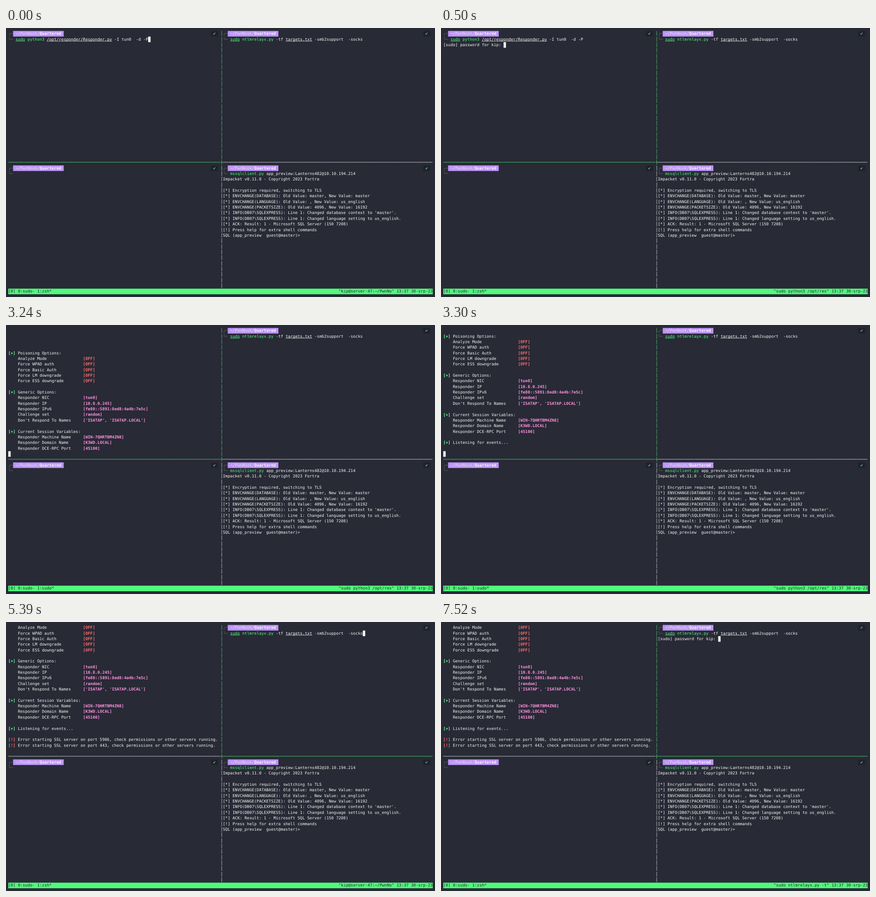
Recreate the animation shown at these times as an HTML page. Size 945 by 593 pixels, loop 8 s.

```html
<!DOCTYPE html>
<html lang="en">
<head>
<meta charset="utf-8">
<title>Terminal panes</title>
<style>
  html, body { margin: 0; width: 100%; height: 100%; overflow: hidden; background: #282a36; }
  svg { display: block; width: 945px; height: 593px; }
  text {
    font: 8.824px "DejaVu Sans Mono", monospace;
    text-rendering: geometricPrecision;
    white-space: pre;
    fill: #f8f8f2;
  }
  .bold { font-weight: bold; }
  .dir { fill: #e4e4e4; }
  .gray { fill: #6c6c6c; }
  .green { fill: #50fa7b; }
  .lime { fill: #69ff94; }
  .red { fill: #ff6e6e; }
  .pink { fill: #ff92df; }
  .dark { fill: #21222c; }
  .fg { fill: #f8f8f2; }
  .purple { fill: #bd93f9; }
  .timed { animation: 8s step-end infinite; }
  .scroll { animation: scroll 8s step-end infinite; }
  @keyframes scroll {
    0% { transform: translateY(37.05px); }
    41.25% { transform: translateY(0); }
    42% { transform: translateY(-24.7px); }
  }
</style>
</head>
<body>
<svg id="stage" viewBox="0 0 945 593">
  <clipPath id="pane"><rect x="5" y="6" width="468" height="285"/></clipPath>
</svg>
<script>
const LOOP = 8000, CW = 5.3125, RH = 12.35, LEFT = 5, TOP = 6.5, BASE = 8.75;
const RIGHT_PANE = 89, LOWER = 24;
const stage = document.getElementById('stage');
const sheet = document.styleSheets[0];
const X = col => LEFT + col * CW;
const Y = row => TOP + row * RH;
let windows = 0;

function add(parent, tag, attrs, text) {
  const el = document.createElementNS('http://www.w3.org/2000/svg', tag);
  for (const key in attrs) el.setAttribute(key, attrs[key]);
  if (text) el.textContent = text;
  return parent.appendChild(el);
}

const box = (g, x, y, width, height, cls) =>
  add(g, 'rect', { x, y, width, height, class: cls });

const cells = (g, col, row, count, cls) => box(g, X(col), Y(row), count * CW, RH, cls);

// Group that is visible only from one time to another within the loop
function during(from, to, parent = stage) {
  const name = 'w' + windows++;
  const pct = t => t / LOOP * 100 + '%';
  sheet.insertRule(`@keyframes ${name} {
    0% { visibility: hidden }
    ${pct(from)} { visibility: visible }
    ${pct(to)} { visibility: hidden }
  }`, sheet.cssRules.length);
  const g = add(parent, 'g', { class: 'timed' });
  g.style.animationName = name;
  return g;
}

// Each run is a plain string or [text, classes]; "under" adds an underline.
// The tiny rotation keeps baselines from snapping to whole pixels.
function print(g, col, row, ...runs) {
  for (const run of runs) {
    const [text, cls = ''] = [].concat(run);
    const y = Y(row) + BASE;
    add(g, 'text', { x: X(col), y, class: cls, transform: 'rotate(.002)' }, text);
    if (cls.includes('under')) {
      box(g, X(col), y + 1, text.length * CW, .8, cls.includes('green') ? 'green' : 'fg');
    }
    col += text.length;
  }
}

const cursor = (g, col, row) => cells(g, col, row, 1, 'fg');

function prompt(g, col, row, check) {
  print(g, col, row, ['╭─', 'gray']);
  print(g, col, row + 1, ['╰─', 'gray']);
  cells(g, col + 2, row, 21, 'purple');
  print(g, col + 3, row, ['~', 'bold dir'], ['/PwnNook/', 'dir'], ['Quartered', 'bold fg']);
  cells(g, check - 1, row, 3, 'dark');
  print(g, check, row, ['✔', 'green']);
}

function divider(from, to, cls) {
  for (let row = from; row < to; row++) print(stage, 88, row, ['│', cls]);
}

const rule = (g, col, count, cls) => print(g, col, 23, ['─'.repeat(count), cls]);

// Pane borders
divider(0, 23, 'green');
divider(LOWER, 46, 'fg');
const leftActive = during(0, 5390), rightActive = during(5390, LOOP);
rule(leftActive, 0, 88, 'green');
rule(leftActive, 89, 87, 'fg');
rule(rightActive, 0, 88, 'fg');
rule(rightActive, 89, 87, 'green');
print(stage, 88, 23, ['┼', 'green']);

// Upper left: command, password, tool output
const PASSWORD = '[sudo] password for kip: ';
const command = during(0, 3240);
prompt(command, 0, 0, 85);
print(command, 3, 1, ['sudo', 'green under'], [' python3', 'green'], ' ',
  ['/opt/responder/Responder.py', 'under'], ' -I tun0  -d -P');
cursor(during(0, 500), 58, 1);
const ask = during(500, 3240);
print(ask, 0, 2, PASSWORD);
cursor(ask, PASSWORD.length, 2);

const pane = add(during(3240, LOOP), 'g', { 'clip-path': 'url(#pane)' });
const output = add(pane, 'g', { class: 'scroll' });
const heading = (g, row, text) => print(g, 0, row, ['[+]', 'bold lime'], ' ' + text);
function section(row, title, cls, items) {
  heading(output, row, title);
  items.forEach(([label, value], i) => {
    print(output, 4, row + 1 + i, label);
    print(output, 31, row + 1 + i, [`[${value}]`, 'bold ' + cls]);
  });
}
section(1, 'Poisoning Options:', 'red',
  ['Analyze Mode', 'Force WPAD auth', 'Force Basic Auth', 'Force LM downgrade', 'Force ESS downgrade']
    .map(label => [label, 'OFF']));
section(8, 'Generic Options:', 'pink', [
  ['Responder NIC', 'tun0'],
  ['Responder IP', '10.8.0.245'],
  ['Responder IPv6', 'fe80::5891:8ed8:4a4b:7e5c'],
  ['Challenge set', 'random'],
  ["Don't Respond To Names", "'ISATAP', 'ISATAP.LOCAL'"]
]);
section(15, 'Current Session Variables:', 'pink', [
  ['Responder Machine Name', 'WIN-7QHRTBM4ZN8'],
  ['Responder Domain Name', 'K3WD.LOCAL'],
  ['Responder DCE-RPC Port', '45100']
]);
heading(during(3300, LOOP, output), 20, 'Listening for events...');
const errors = during(3360, LOOP, output);
[5986, 443].forEach((port, i) => print(errors, 0, 22 + i, ['[!]', 'bold red'],
  ` Error starting SSL server on port ${port}, check permissions or other servers running.`));
cursor(during(3240, 5390), 0, 22);

// Upper right
prompt(stage, RIGHT_PANE, 0, 173);
print(stage, RIGHT_PANE + 3, 1, ['sudo', 'green under'], [' ntlmrelayx.py', 'green'], ' -tf ',
  ['targets.txt', 'under'], ' -smb2support  -socks');
cursor(during(5390, 7520), RIGHT_PANE + 58, 1);
const askRight = during(7520, LOOP);
print(askRight, RIGHT_PANE, 2, PASSWORD);
cursor(askRight, RIGHT_PANE + PASSWORD.length, 2);

// Lower panes
prompt(stage, 0, LOWER, 85);
prompt(stage, RIGHT_PANE, LOWER, 173);
print(stage, RIGHT_PANE + 3, LOWER + 1, ['mssqlclient.py', 'green'],
  ' app_preview:Lanterns482@10.10.194.214');
[
  'Impacket v0.11.0 - Copyright 2023 Fortra',
  '',
  '[*] Encryption required, switching to TLS',
  '[*] ENVCHANGE(DATABASE): Old Value: master, New Value: master',
  '[*] ENVCHANGE(LANGUAGE): Old Value: , New Value: us_english',
  '[*] ENVCHANGE(PACKETSIZE): Old Value: 4096, New Value: 16192',
  "[*] INFO(DB07\\SQLEXPRESS): Line 1: Changed database context to 'master'.",
  '[*] INFO(DB07\\SQLEXPRESS): Line 1: Changed language setting to us_english.',
  '[*] ACK: Result: 1 - Microsoft SQL Server (150 7208)',
  '[!] Press help for extra shell commands',
  'SQL (app_preview  guest@master)>'
].forEach((line, i) => print(stage, RIGHT_PANE, LOWER + 2 + i, line));

// Status bar
cells(stage, 0, 46, 176, 'green');
const status = (g, col, text) => print(g, col, 46, [text, 'dark']);
status(stage, 0, '[0] 0:sudo- 1:');
[[0, 1890, 'zsh*'], [1890, 5390, 'sudo*'], [5390, LOOP, 'zsh*']]
  .forEach(([from, to, name]) => status(during(from, to), 14, name));
const HOME = 'kip@server-47:~/PwnNo';
[
  [0, 500, HOME],
  [500, 5390, 'sudo python3 /opt/res'],
  [5390, 7520, HOME],
  [7520, LOOP, 'sudo ntlmrelayx.py -t']
].forEach(([from, to, title]) => status(during(from, to), 137, `"${title}"`));
status(stage, 161, '13:37 30-srp-23');
</script>
</body>
</html>
```
